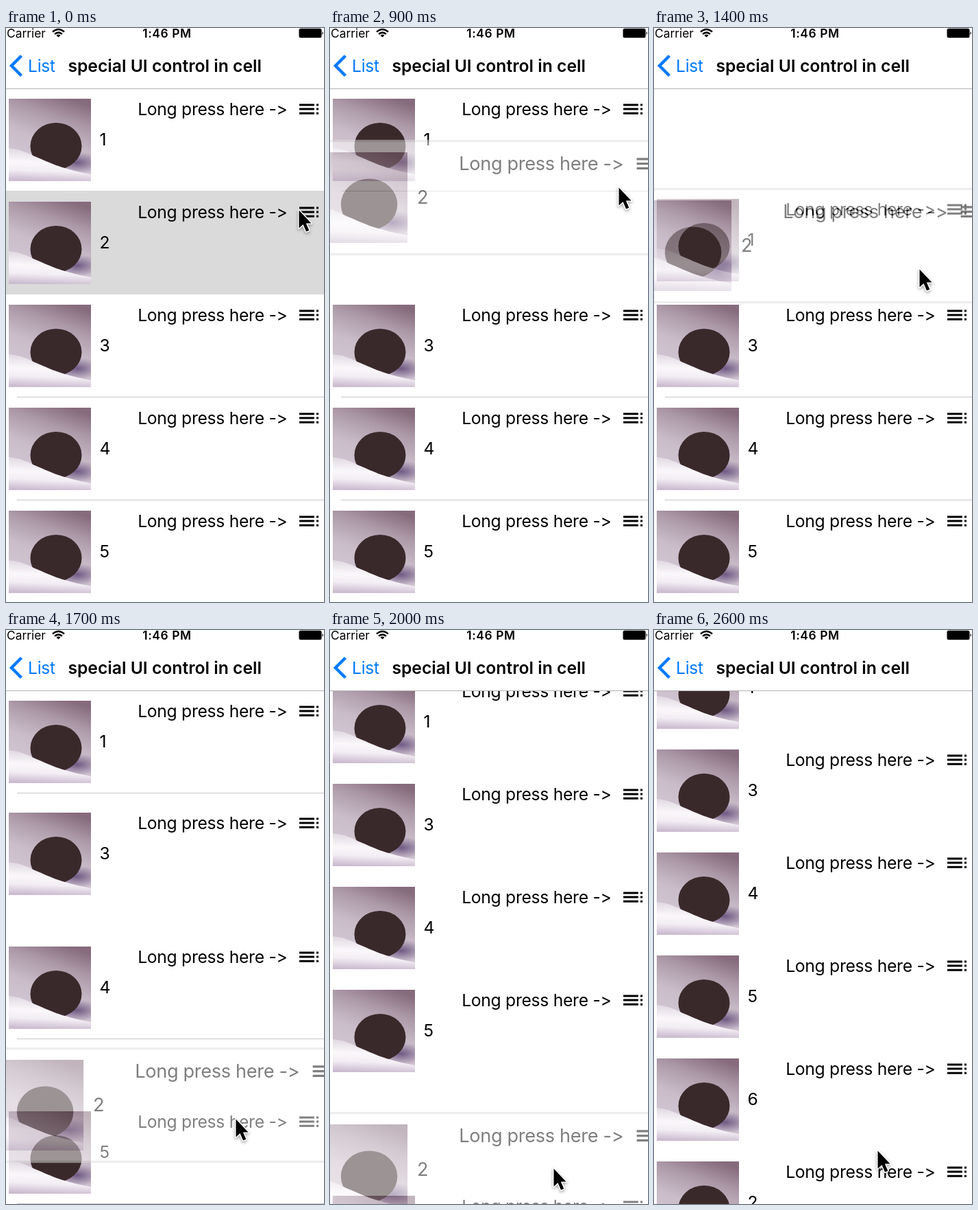
An HTML page for the animation above (2700 ms loop, 464 by 836 pixels).

```html
<!DOCTYPE html>
<html lang="en">
<head>
<meta charset="utf-8">
<title>Reorder cells by long press</title>
<style>
  html, body { margin: 0; width: 100%; height: 100%; overflow: hidden; background: #fff; }
  svg { display: block; width: 100vw; height: 100vh; }
  text {
    font: 24.65px Inter, "Liberation Sans", sans-serif;
    font-variant-ligatures: none;
    font-feature-settings: "calt" 0;
    letter-spacing: -.28px;
    white-space: pre;
  }
  .title { font-weight: 600; letter-spacing: .03px; text-anchor: middle; }
  .status { font-size: 17.4px; letter-spacing: 0; }
  .clock { font-size: 17.4px; font-weight: 600; letter-spacing: .6px; text-anchor: middle; }
</style>
</head>
<body>
<svg viewBox="0 0 464 836" preserveAspectRatio="none">
  <defs>
    <linearGradient id="sky" x1=".75" y1="0" x2=".4" y2="1">
      <stop offset="0" stop-color="#866b7c"/>
      <stop offset=".25" stop-color="#ac99a8"/>
      <stop offset=".55" stop-color="#cabdc9"/>
      <stop offset="1" stop-color="#d6cad9"/>
    </linearGradient>
    <linearGradient id="snow" x1=".55" y1="0" x2=".45" y2="1">
      <stop offset="0" stop-color="#ddd4df"/>
      <stop offset=".45" stop-color="#faf7fa"/>
      <stop offset=".7" stop-color="#f3edf4"/>
      <stop offset="1" stop-color="#cbbcd0"/>
    </linearGradient>
    <radialGradient id="shade">
      <stop offset="0" stop-color="#705a84"/>
      <stop offset="1" stop-color="#705a84" stop-opacity="0"/>
    </radialGradient>
    <clipPath id="frame"><rect width="120" height="120"/></clipPath>

    <g id="photo" clip-path="url(#frame)">
      <rect width="120" height="120" fill="url(#sky)"/>
      <ellipse cx="100" cy="93" rx="36" ry="16" fill="url(#shade)"/>
      <ellipse cx="69" cy="69" rx="37.5" ry="34" fill="#3a292b"/>
      <path d="M0 72C18 74 28 79 38 84C58 92 72 101 120 110V120H0Z" fill="url(#snow)"/>
    </g>

    <path id="menu" d="M428 8.900h21.800m3.100 0h3.100M428 15.100h21.800m3.100 0h3.100M428 21.300h21.800m3.100 0h3.100"
          stroke="#000" stroke-width="3"/>
  </defs>

  <rect width="464" height="836" fill="#fff"/>
  <g id="list"></g>

  <g id="nav">
    <rect width="464" height="88" fill="#fff"/>
    <path d="M0 88.500H464" stroke="#b2b2b2"/>
    <text class="status" x="1" y="14">Carrier</text>
    <g fill="none" stroke="#000" stroke-width="2.500">
      <path d="M68 5.600Q76.500 -1.600 85 5.600M71 8.900Q76.500 4.400 82 8.900"/>
      <path d="M76.500 13.500L73.500 10.700Q76.500 8.300 79.500 10.700Z" fill="#000" stroke="none"/>
    </g>
    <text class="clock" x="235" y="14">1:46 PM</text>
    <rect x="427.500" y=".800" width="33" height="13.400" rx="2.500" fill="#000"/>
    <path d="M461.500 5Q464 7.500 461.500 10Z"/>
    <path d="M22.500 40.500L8 55L22.500 69.500" fill="none" stroke="#007aff" stroke-width="4.400"/>
    <text x="32" y="64" fill="#007aff">List</text>
    <text class="title" x="231.700" y="64">special UI control in cell</text>
  </g>

  <g id="cursor">
    <path d="M.500 1.500V27.500L6.500 22L11 32.500L15.300 30.700L10.800 20.500H18.500Z" fill="#000" stroke="#fff"
          stroke-width="3" stroke-linejoin="round" paint-order="stroke"
          style="filter: drop-shadow(0 2px 2px rgba(0,0,0,.35))"/>
  </g>
</svg>

<script>
const LOOP = 2700, STEP = 100, PITCH = 150, TOP = 103;
const list = document.getElementById('list');
const cursor = document.getElementById('cursor');

const clamp = v => Math.min(1, Math.max(0, v));
const ramp = (t, start, span) => clamp((t - start) / span);
const ease = p => p * p * (3 - 2 * p);

// Linear interpolation through [time, value] pairs
function track(keys, t) {
  const i = keys.findIndex(k => k[0] > t);
  if (i < 0) return keys[keys.length - 1][1];
  if (i === 0) return keys[0][1];
  const [t0, a] = keys[i - 1], [t1, b] = keys[i];
  return a + (b - a) * (t - t0) / (t1 - t0);
}

const cursorX = [[0, 427], [700, 427], [900, 421], [1400, 387], [1700, 335], [1900, 326]];
const cursorY = [[0, 264], [700, 264], [900, 231], [1000, 190], [1100, 158], [1200, 155], [1300, 208],
  [1400, 350], [1500, 475], [1600, 612], [1700, 711], [1800, 765], [1900, 783], [2300, 783], [2500, 757]];
const liftY = [[0, 313], [700, 313], [800, 265], [900, 247], [1000, 200], [1100, 167], [1200, 160],
  [1300, 195], [1400, 317], [1500, 445], [1600, 585], [1700, 692], [1800, 765], [1900, 786]];

// moves: [start, slots]; line: times when the separator shows
const rows = [
  { n: 1, slot: 0, moves: [[900, 1], [1371, -1]], line: [[400, 1000], [1500, 1800]] },
  { n: 3, slot: 2, moves: [[1454, -1]], line: [[0, 1500]] },
  { n: 4, slot: 3, moves: [[1527, -1]], line: [[0, 1800]] },
  { n: 5, slot: 4, moves: [[1682, -1]], line: [[0, 2000]] },
  { n: 6, slot: 5, moves: [[2128, -1]], line: [] }
];

function addGroup(markup) {
  const g = document.createElementNS('http://www.w3.org/2000/svg', 'g');
  g.innerHTML = markup;
  list.append(g);
  return g;
}

// Row origin is the top of its picture
const content = n => `
  <use href="#photo" x="4"/>
  <text x="136.500" y="68">${n}</text>
  <text x="192.200" y="24">Long press here -&gt;</text>
  <use href="#menu"/>`;

for (const row of rows) {
  row.el = addGroup(content(row.n) + '<path d="M16 134.500H464" stroke="#c8c7cc"/>');
  row.rule = row.el.lastElementChild;
}
const pressed = addGroup('<rect y="-16" width="464" height="151" fill="#dadada"/>' + content(2));
const shade = pressed.firstElementChild;
const lifted = addGroup(
  '<rect x="-4" y="-15" width="472" height="150" fill="#fff" stroke="#dedede" stroke-width="3"/>' + content(2));

const LIFT = 400, DROP = 2300;

function draw(t) {
  const scroll = Math.min(79, Math.max(0, (t - 1847) * .19));
  const place = (el, slot) =>
    el.setAttribute('transform', `translate(0 ${Math.round(TOP + slot * PITCH - scroll)})`);

  for (const row of rows) {
    place(row.el, row.moves.reduce((s, [at, by]) => s + by * ease(ramp(t, at, 300)), row.slot));
    row.rule.style.display = row.line.some(([a, b]) => t >= a && t < b) ? '' : 'none';
  }

  const up = ease(ramp(t, LIFT, 250)), down = ease(ramp(t, DROP, 250));
  place(pressed, t < 1000 ? 1 : 5);
  pressed.style.opacity = 1 - up + down;
  shade.style.display = t < LIFT + 100 ? '' : 'none';

  const home = TOP + 60 + 5 * PITCH - scroll;
  const y = track(liftY, t) * (1 - down) + home * down;
  const size = 1 + .1 * (up - down);
  lifted.setAttribute('transform', `translate(232 ${y}) scale(${size}) translate(-232 -60)`);
  lifted.style.opacity = .5 * (up - down);

  cursor.setAttribute('transform', `translate(${track(cursorX, t)} ${track(cursorY, t)})`);
}

const start = performance.now();
function tick() {
  const t = (performance.now() - start) % LOOP;
  draw(Math.floor(t / STEP) * STEP);
  requestAnimationFrame(tick);
}
tick();
</script>
</body>
</html>
```
